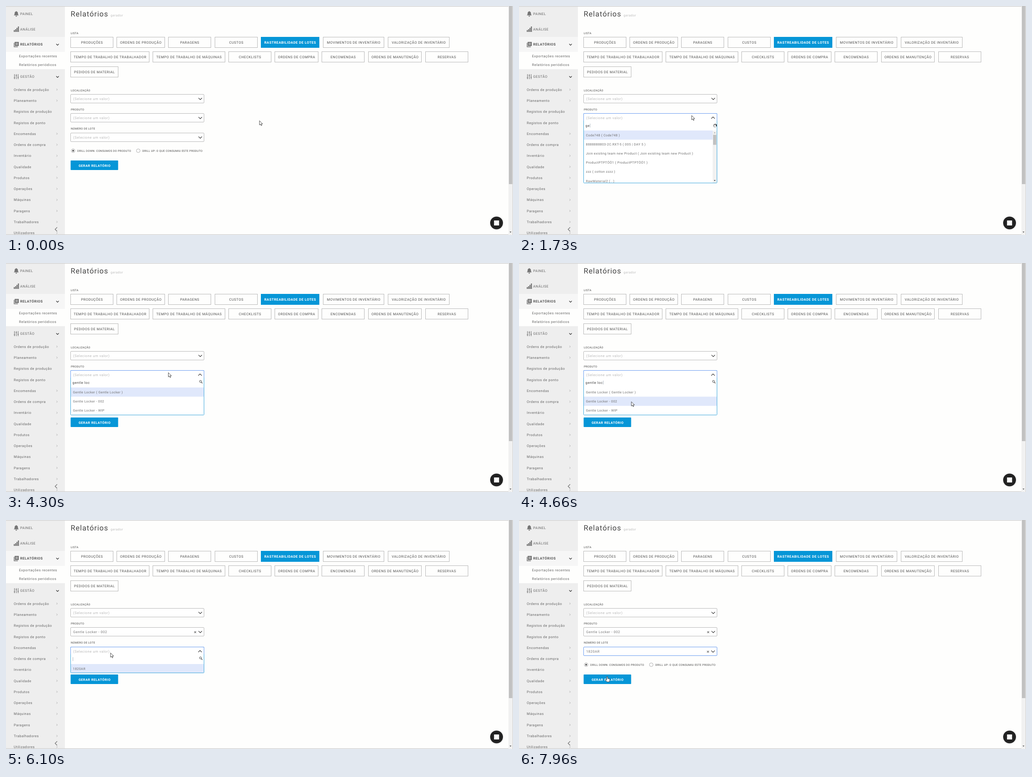
Write an HTML page that moves like this. It is 1110x504 px and loops after 8000 ms.

```html
<!DOCTYPE html>
<html lang="pt">
<head>
<meta charset="utf-8">
<title>Relatórios</title>
<style>
  html, body { margin: 0; width: 100%; height: 100%; overflow: hidden; background: #fefefd; }
  svg { display: block; }
  text { font-family: Roboto, sans-serif; white-space: pre; text-rendering: geometricPrecision; }
</style>
</head>
<body>
<svg id="stage" width="1110" height="504" viewBox="0 0 1110 504">
  <g id="page"></g>
  <g id="live"></g>
</svg>
<script>
const LOOP = 8000, BLUE = '#0696d7', PANEL = '#3fa8dd', FOCUS = '#6b9df0', BORDER = '#b9b9b9';
const PLACEHOLDER = '(Selecione um valor)', PRODUCT = 'Gentle Locker', QUERY = 'gentle loc', LOT = '1820AR';
const LOCATION_Y = 194.5, PRODUCT_Y = 236.5, LOT_Y = 279.5;

// Drawing helpers; text is placed by its vertical centre
const rect = (x, y, w, h, fill, stroke = 'none', rx = 0) =>
  `<rect x="${x}" y="${y}" width="${w}" height="${h}" rx="${rx}" fill="${fill}" stroke="${stroke}"/>`;
const line = (d, color = '#444', width = 1) =>
  `<path d="${d}" fill="none" stroke="${color}" stroke-width="${width}"/>`;
const fill = (d, color) => `<path d="${d}" fill="${color}"/>`;
const circle = (x, y, r, color, stroke = 'none') =>
  `<circle cx="${x}" cy="${y}" r="${r}" fill="${color}" stroke="${stroke}"/>`;
const text = (x, y, str, { size = 7.6, gap = .5, color = '#666', weight = 400, anchor = 'start' } = {}) =>
  `<text x="${x}" y="${y + size * .36}" font-size="${size}" letter-spacing="${gap}" fill="${color}"
    font-weight="${weight}" text-anchor="${anchor}">${str}</text>`;
const label = (x, y, str) => text(x, y, str, { size: 6, gap: .3, color: '#444' });
const item = (x, y, str) => text(x, y, str, { size: 7.2, gap: .36, color: '#707070' });

function sidebar() {
  const entries = ['Ordens de produção', 'Planeamento', 'Registos de produção', 'Registos de ponto',
    'Encomendas', 'Ordens de compra', 'Inventário', 'Qualidade', 'Produtos', 'Operações',
    'Máquinas', 'Paragens', 'Trabalhadores', 'Utilizadores'];
  const gray = '#757575';
  let out = rect(0, 0, 129, 504, '#eee') + rect(0, 68, 129, 33, '#f6f6f6') + rect(0, 101, 129, 38, '#fefefd');
  out += fill('M17 20.5q2-1.500 2-5q0-3 3-3.500v-.8h1v.8q3 .5 3 3.500q0 3.500 2 5zM20.500 21.500h4q-.5 2-2 2t-2-2z', gray);
  out += fill('M17 53h2.300v4H17zM20 51h2.300v6H20zM23 48h2.300v9H23zM26 45h2.300v12H26z', gray);
  out += fill('M19 79h9v9h-9zM17 81h1.200v8H26v1.500h-9z', gray) + line('M21 82h5M21 84.500h5', '#eee');
  out += line('M18.500 150v11M22.500 150v11M26.500 150v11M17 158h3M21 153h3M25 157h3', gray, 1.1);
  out += text(31, 17, 'PAINEL') + text(31, 51, 'ANÁLISE')
    + text(31, 84, 'RELATÓRIOS', { weight: 700, color: '#555' }) + text(31, 155.5, 'GESTÃO');
  out += line('M110 83.500l2.800 2.800l2.800-2.800M110 154.500l2.800 2.800l2.800-2.800', '#333', 1.2);
  out += text(28.5, 110, 'Exportações recentes') + text(28.5, 129, 'Relatórios periódicos');
  entries.forEach((name, i) => {
    const y = 184 + i * 24.27;
    out += text(17, y, name);
    if (!name.startsWith('Registos')) out += line(`M110.500 ${y - 2}l2 2l-2 2`, '#999', .8);
  });
  return out + line('M112 487l-4.500 4.500l4.500 4.500', '#777', 1.4);
}

function reportButtons() {
  const rows = [
    [[141, 94, 'PRODUÇÕES'], [242, 106, 'ORDENS DE PRODUÇÃO'], [355, 94, 'PARAGENS'], [457, 94, 'CUSTOS'],
      [558, 128, 'RASTREABILIDADE DE LOTES'], [694, 134, 'MOVIMENTOS DE INVENTÁRIO'], [836, 135, 'VALORIZAÇÃO DE INVENTÁRIO']],
    [[141, 173, 'TEMPO DE TRABALHO DE TRABALHADOR'], [321, 159, 'TEMPO DE TRABALHO DE MÁQUINAS'], [487, 94, 'CHECKLISTS'],
      [588, 96, 'ORDENS DE COMPRA'], [691, 94, 'ENCOMENDAS'], [793, 117, 'ORDENS DE MANUTENÇÃO'], [918, 94, 'RESERVAS']],
    [[141, 105, 'PEDIDOS DE MATERIAL']]
  ];
  return rows.map((row, i) => row.map(([x, w, name]) => {
    const active = name.startsWith('RAST'), y = Math.floor(68.2 + i * 32.4);
    return rect(x + .5, y + .5, w - 1, 23, active ? BLUE : '#fefefd', active ? BLUE : BORDER)
      + text(x + w / 2 + .25, y + 12, name,
        { anchor: 'middle', color: active ? '#fff' : '#505050', weight: active ? 700 : 400 });
  }).join('')).join('');
}

function staticPage() {
  return sidebar()
    + text(141.5, 17.5, 'Relatórios', { size: 16.2, gap: 1, color: '#444' })
    + text(229, 20.5, 'gerador', { size: 7, color: '#bbb' })
    + label(141.5, 59.5, 'LISTA') + reportButtons()
    + label(142, 185.5, 'LOCALIZAÇÃO') + label(142, 228, 'PRODUTO') + label(142, 270, 'NÚMERO DE LOTE')
    + circle(147, 318.5, 4, '#fff', '#aaa') + circle(147, 318.5, 2, '#555') + label(156, 318.5, 'DRILL DOWN: CONSUMOS DO PRODUTO')
    + circle(289.5, 318.5, 4, '#fff', '#aaa') + label(298.5, 318.5, 'DRILL UP: O QUE CONSUMIU ESTE PRODUTO')
    + rect(141.5, 340, 104, 21, BLUE, 'none', 1)
    + text(194, 351, 'GERAR RELATÓRIO', { size: 7.2, color: '#fff', weight: 700, anchor: 'middle' })
    + rect(0, 0, 1110, 1.5, '#d5d5d5') + rect(0, 502.5, 1110, 1.5, '#d5d5d5')
    + rect(1100, 0, 10, 504, '#f1f1f1') + rect(1101, 0, 7.5, 392, '#c1c1c1') + rect(1109, 0, 1, 504, '#d0d0d0')
    + fill('M1102.500 496.500h4l-2 2.500z', '#555')
    + circle(1074, 478, 15.5, '#f3f3f2') + circle(1074, 477.5, 14, '#222') + rect(1068.5, 472, 11, 11, '#fff');
}

function select(y, value, focused, open) {
  const shift = focused ? -.5 : 0, mid = y + 9.3;
  let out = rect(141.5, y, 292, 19, '#fff', focused ? FOCUS : BORDER, 1.5);
  out += text(147, mid, value || PLACEHOLDER, { size: value ? 7.6 : 7.7, color: value ? '#777' : '#b8b8b8' });
  if (value) out += line(`M${412.2 + shift} ${mid - 1}l4 4m0-4l-4 4`, '#666', 1.1);
  return out + line(`M${421.5 + shift} ${mid + (open ? 2 : -1.5)}l3.800 ${open ? -3.8 : 3.8}l3.800 ${open ? 3.8 : -3.8}`, '#333', 1.2);
}

function spinner(y, t) {
  const step = Math.floor(t / 70);
  let out = '';
  for (let i = 0; i < 8; i++) {
    const a = i * Math.PI / 4, fade = 1 - ((step - i) % 8 + 8) % 8 / 8;
    const x = 429.5 + 3.2 * Math.cos(a);
    out += `<circle cx="${Math.min(x, 432)}" cy="${y + 3.2 * Math.sin(a)}" r="1.2" fill="#222" opacity="${fade}"/>`;
  }
  return out;
}

const magnifier = y => circle(425.8, y - 3, 2.2, 'none', '#444') + line(`M427.500 ${y - 1.3}l2.500 2.500`, '#444', 1.3);

// Panel under an opened select: search field and result rows
function dropdown(y, options, { value, typed, caret, row, loading, t }) {
  const rows = options.length, long = rows > 3;
  const height = rows === 0 ? 49 : long ? 153 : Math.round(37.2 + rows * 20.2);
  const searchY = y + 27, listY = y + 37.5;
  let out = rect(141.5, y, 292, height, '#fff', PANEL, 1) + select(y, value, true, true)
    + rect(142, y + 17, 291, 4, '#fff') + line(`M141.500 ${y + 16}v6M433.500 ${y + 16}v6`, PANEL);
  out += text(145.5, searchY, typed + (caret ? '<tspan font-size="10" font-weight="300" fill="#678">|</tspan>' : ''), { color: '#444' });
  out += loading ? spinner(searchY, t) : magnifier(searchY);
  if (rows) out += rect(142, listY + row * 20.2, long ? 282 : 291, Math.min(20.2, y + height - .5 - listY), '#e0e8fb');
  options.forEach((name, i) => out += item(146.5, listY + 10 + i * 20.2, name));
  if (long) out += rect(424, y + 38, 9, 114.5, '#f1f1f1') + rect(425, y + 47, 7, 22, '#c1c1c1')
    + fill(`M426.500 ${y + 43.5}h4l-2-2.500z`, '#aaa') + fill(`M426.500 ${y + 146.5}h4l-2 2.500z`, '#444');
  return out;
}

// Pointer path: time, x, y
const path = [[0, 555, 252.5], [70, 555, 252.5], [160, 562, 255], [300, 562, 255], [760, 373.5, 245.5],
  [930, 373.5, 245.5], [1360, 378, 241], [4270, 378, 241], [4300, 356, 241], [4700, 245, 306], [5430, 245, 306],
  [5730, 229, 292.5], [6100, 229, 292.5], [6600, 204.5, 303], [6750, 204.5, 303], [7000, 179, 329],
  [7770, 179, 329], [7960, 193, 344], [LOOP, 193, 344]];

function pointerAt(t) {
  const i = path.findIndex(p => p[0] > t), [t0, x0, y0] = path[i - 1], [t1, x1, y1] = path[i];
  const k = (t - t0) / (t1 - t0), e = k * (2 - k);
  return [x0 + (x1 - x0) * e, y0 + (y1 - y0) * e];
}

function pointer(x, y, kind) {
  const shapes = {
    arrow: '<path d="M0 0v9.500l2.200-2l1.600 3.400l1.500-.7l-1.500-3.300h3z" fill="#fff" stroke="#222" stroke-width=".8"/>',
    beam: line('M-2-4.500q2 0 2 1q0-1 2-1M0-3.500v7M-2 4.500q2 0 2-1q0 1 2 1', '#222', .9),
    hand: '<path d="M-1 .8q1-1.200 2 0v4l4 .8q1 .4 1 1.600l-1 5H-.5l-3.500-4q.3-1.500 1.500-.8l1.500 1z" fill="#fff" stroke="#222" stroke-width=".8"/>'
  };
  return `<g transform="translate(${x.toFixed(2)} ${y.toFixed(2)})">${shapes[kind]}</g>`;
}

const keyTimes = [1500, 1730, 1880, 2030, 2200, 2380, 2500, 3150, 3300, 3530];
const allProducts = ['Code748 ( Code748 )', '8888888803-2C.RXT-5 ( 005 | DAY 5 )',
  'Join existing team new Product ( Join existing team new Product )',
  'ProductPTPTÖÖ1 ( ProductPTPTÖÖ1 )', 'zzz ( cotton zzzz )', 'RawMaterial2 ( . )'];
const matches = [`${PRODUCT} ( ${PRODUCT} )`, `${PRODUCT} - 002`, `${PRODUCT} - WIP`];

function scene(t) {
  const within = (a, b) => t >= a && t < b;
  const [x, y] = pointerAt(t);
  const productOpen = within(930, 4930), lotOpen = within(5900, 7230);
  const product = t >= 4930 ? matches[1] : '';
  let out = select(LOCATION_Y, '') + select(PRODUCT_Y, product, within(930, 5900))
    + select(LOT_Y, t >= 7230 ? LOT : '', t >= 5900);
  if (productOpen) {
    const count = keyTimes.filter(k => k <= t).length;
    const blinkStart = count ? keyTimes[count - 1] : 1000;
    out += dropdown(PRODUCT_Y, t < 1500 ? [] : t < 3530 ? allProducts : matches, {
      typed: QUERY.slice(0, count), caret: (t - blinkStart) % 1000 < 500,
      row: Math.max(0, Math.floor((y - 274) / 20.2)),
      loading: t < 1500 || within(1730, 3530), t
    });
  }
  if (lotOpen) out += dropdown(LOT_Y, t < 6100 ? [] : [LOT], {
    typed: '', caret: (t - 5930) % 1000 < 500, row: 0, loading: t < 6100, t
  });
  const kind = lotOpen && y > 297 && y < 312 ? 'beam' : y > 340 ? 'hand' : 'arrow';
  return out + pointer(x, y, kind);
}

document.getElementById('page').innerHTML = staticPage();
const live = document.getElementById('live');
function draw() {
  live.innerHTML = scene(performance.now() % LOOP);
  requestAnimationFrame(draw);
}
draw();
</script>
</body>
</html>
```
